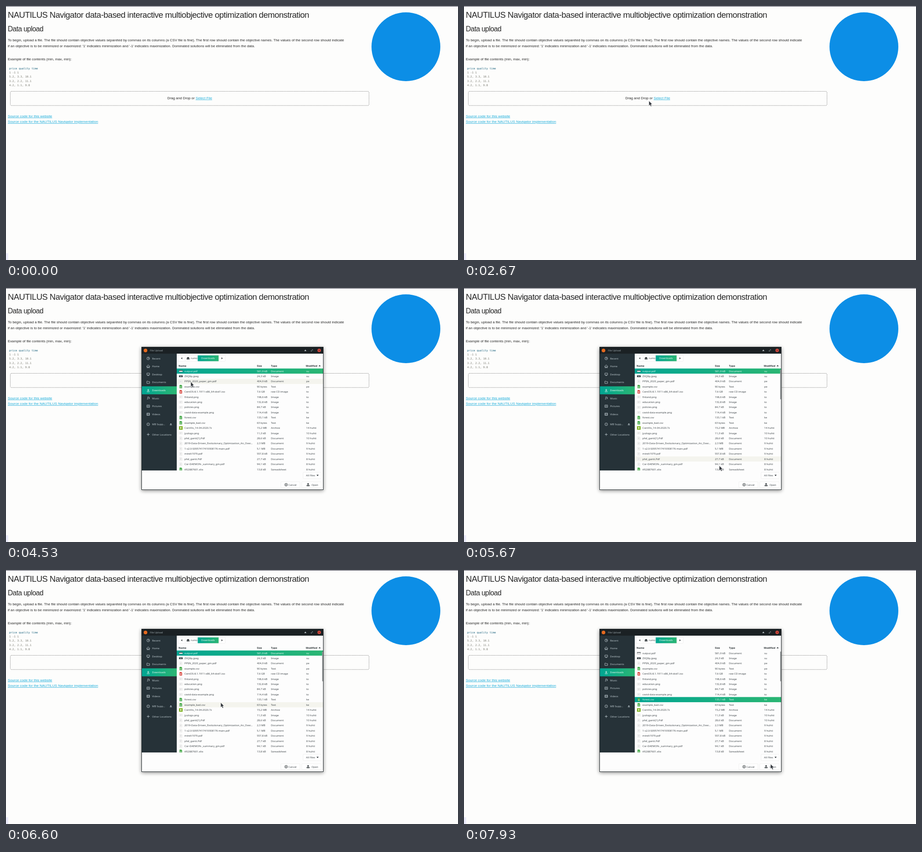
Write an HTML page that moves like this. It is 998 px wide and 561 px high and loops after 8 s.

```html
<!DOCTYPE html>
<html lang="en">
<head>
<meta charset="utf-8">
<style>
html, body { margin: 0; width: 100%; height: 100%; overflow: hidden; background: #fdfdfc; }
svg { display: block; }
text { font: 7.8px "Liberation Sans", Arial, sans-serif; fill: #262626; white-space: pre; }
.h1 { font-size: 18.6px; letter-spacing: -.54px; }
.h2 { font-size: 15.6px; letter-spacing: -.52px; }
.link { fill: #1eaedb; text-decoration: underline; }
.code { font: 5.86px "DejaVu Sans Mono", monospace; fill: #74746a; }
.code.head { fill: #17607c; }
.ui { font: 5.75px "Noto Sans", sans-serif; fill: #41484c; }
.bold { font-weight: 600; fill: #2c3336; }
.side { fill: #b9c5ca; }
.lit { fill: #e2f7ee; }
.title { font-size: 5.4px; fill: #9aa6ab; }
.icon { fill: none; stroke: #b9c5ca; stroke-width: .9; }
.btn { fill: #fff; stroke: #ededeb; stroke-width: .8; }
</style>
</head>
<body>
<svg id="stage" width="998" height="561" viewBox="0 0 998 561">
  <defs>
    <linearGradient id="green"><stop stop-color="#00a593"/><stop offset="1" stop-color="#2bb673"/></linearGradient>
    <clipPath id="listClip"><rect x="377" y="177" width="323" height="226"/></clipPath>
    <filter id="shadow" x="-10%" y="-10%" width="120%" height="120%"><feGaussianBlur stdDeviation="4"/></filter>
    <mask id="outside"><rect width="998" height="561" fill="#fff"/><rect x="299" y="130" width="402" height="316" fill="#000"/></mask>
  </defs>
  <rect width="998" height="561" fill="#fdfdfc"/>
  <rect width="998" height="1" fill="#383848"/>
  <rect y="546" width="5" height="15" fill="#ececfb"/>
  <g id="page"></g>
  <circle cx="883" cy="90" r="76" fill="#0c8ee6"/>
  <rect x="9.5" y="188.5" width="792" height="31.3" rx="2.5" fill="none" stroke="#555" stroke-width=".8" stroke-dasharray="1.6"/>
  <g id="dialog">
    <g mask="url(#outside)"><rect x="299" y="132" width="402" height="316" fill="#000" opacity=".45" filter="url(#shadow)"/></g>
    <g id="content">
      <rect x="299" y="130" width="402" height="316" fill="#fdfdfd"/>
      <rect x="299" y="144" width="78" height="259" fill="#263238"/>
      <rect x="300" y="217.2" width="77" height="17.6" fill="url(#green)"/>
      <g id="sidebar"></g>
      <g id="bar"></g>
      <g clip-path="url(#listClip)">
        <rect id="hover" x="377" width="323" height="11.4" fill="#f4f4ee"/>
        <rect id="pick" x="377" width="323" height="11.4" fill="url(#green)"/>
        <g id="list"></g>
        <rect id="scroll" x="698" y="180" width="2" height="66" rx="1" fill="#9a9f9f"/>
      </g>
    </g>
    <rect x="299.5" y="130.5" width="401" height="315" fill="none" stroke="#20272a"/>
    <rect x="299" y="130" width="402" height="15" fill="#1b2124"/>
    <circle cx="308" cy="138" r="4" fill="#e66a1f"/>
    <text class="ui title" x="318" y="139.7">File Upload</text>
    <path d="M658.6 139.3h4.8l-2.4-3.2z" fill="#c2cbcf"/>
    <path d="M673.6 139.6l3.6-3.6m-1.8 0h1.8v1.8m-3.6 0v1.8h1.8" fill="none" stroke="#98a3a8" stroke-width=".7"/>
    <circle cx="691.5" cy="137.7" r="3.8" fill="#d5473c"/>
    <path d="M690.2 136.4l2.6 2.6m0-2.6l-2.6 2.6" stroke="#301513" stroke-width=".7"/>
  </g>
  <path id="cursor" d="M0 0v10.2l2.2-2 1.8 3.8 1.8-.8-1.7-3.7 3-.2z" fill="#30343a" stroke="#eee" stroke-width=".5"/>
</svg>
<script>
const $ = id => document.getElementById(id);
const text = (x, y, s, cls = '') => `<text x="${x}" y="${y}" class="${cls}">${s}</text>`;
const ui = (x, mid, s, cls = '') => text(x, mid + 2.05, s, 'ui ' + cls);
const button = (x, y, w, h, fill = '#fff') =>
  `<rect class="btn" x="${x}" y="${y}" width="${w}" height="${h}" rx="1" style="fill:${fill}"/>`;
const shape = (x, y, d, attr = 'fill="#2c3336"') => `<path transform="translate(${x} ${y})" d="${d}" ${attr}/>`;

const code = ['price quality time', '1 -1 1', '5.2, 3.3, 10.1', '3.2, 2.2, 11.1', '4.2, 1.1, 9.8'];
$('page').innerHTML =
  text(4, 26, 'NAUTILUS Navigator data-based interactive multiobjective optimization demonstration', 'h1') +
  text(4, 56, 'Data upload', 'h2') +
  text(4, 78.3, 'To begin, upload a file. The file should contain objective values separeted by commas on its columns (a CSV file is fine). The first row should contain the objective names. The values of the second row should indicate') +
  text(4, 90.8, "if an objective is to be minimized or maximized: '1' indicates minimization and '-1' indicates maximization. Dominated solutions will be eliminated from the data.") +
  text(4, 120, 'Example of file contents (min, max, min):') +
  code.map((s, i) => text(7, 139.8 + i * 9.3, s, i ? 'code' : 'code head')).join('') +
  text(356.3, 205.8, 'Drag and Drop or <tspan class="link">Select File</tspan>') +
  text(4, 245.7, 'Source code for this website', 'link') +
  text(4, 258.2, 'Source code for the NAUTILUS Navigator implementation', 'link');

const house = 'M-3.7 .3L0-3.2 3.7 .3H2.5V3.2H.8V1H-.8V3.2H-2.5V.3z';
const disc = 'M-3 0a3 3 0 1 0 6 0a3 3 0 1 0-6 0';
const places = [
  ['Recent', 155.5, disc + 'M0-2V0H2'],
  ['Home', 173, house],
  ['Desktop', 190.5, 'M-3-2.5H3V1.6H-3zM-1.5 3H1.5'],
  ['Documents', 208.3, 'M-3-2.5H-.5L.5-1.5H3V2.5H-3z'],
  ['Downloads', 226, 'M0-3V1M-2-1L0 1 2-1M-3 3H3'],
  ['Music', 243.5, 'M-1 2V-3L2.5-2V1M-2.5 2H-1M1 1H2.5'],
  ['Pictures', 261, 'M-3-2.5H3V2.5H-3zM-2 1.5L0-1 2 1.5'],
  ['Videos', 278.8, 'M-3-2.5H3V2.5H-3zM-1.5-2.5V2.5M1.5-2.5V2.5'],
  ['MB Supp...', 301, disc + 'M-.8 0H.8'],
  ['Other Locations', 323.5, 'M-3 0H3M0-3V3']
];
$('sidebar').innerHTML = places.map(([name, y, d]) =>
  shape(314, y, d, `class="icon" ${name == 'Downloads' ? 'style="stroke:#fff"' : ''}`) +
  ui(322.5, y, name, name == 'Downloads' ? 'lit' : 'side')).join('') +
  shape(364, 301, 'M-2.3 .6L0-2.2 2.3 .6zM-2.3 1.4H2.3V2.2H-2.3z', 'fill="#b9c5ca"');

const upload = 'M-3.3 1H3.3V3H-3.3zM-.9 0V-1H-2.6L0-3.7 2.6-1H.9V0z';
$('bar').innerHTML =
  button(380, 148.5, 15.5, 13.5) + shape(388, 155.3, 'M1.2-2.3V2.3L-1.4 0z') +
  button(395.5, 148.5, 27.5, 13.5) + shape(402, 155.3, house) + ui(408, 155.3, 'rumo') +
  button(423, 148.5, 47, 13.5, 'url(#green)') + ui(431, 155.3, 'Downloads', 'lit') +
  button(470, 148.5, 14, 13.5) + shape(477, 155.3, 'M-1.2-2.3V2.3L1.4 0z') +
  ui(381, 171.8, 'Name', 'bold') + ui(554, 171.8, 'Size', 'bold') +
  ui(585, 171.8, 'Type', 'bold') + ui(662, 171.8, 'Modified', 'bold') +
  shape(692.5, 171.8, 'M-2.4 1.3H2.4L0-1.6z') +
  button(656, 407, 40, 14) + ui(662.5, 413.8, 'All Files') + shape(688, 413.8, 'M-2.4-1.3H2.4L0 1.6z') +
  button(607, 428, 42, 13) + shape(618.5, 434.5, disc, 'fill="none" stroke="#2c3336"') +
  shape(618.5, 434.5, 'M-1.3-1.3L1.3 1.3M1.3-1.3L-1.3 1.3', 'stroke="#2c3336"') + ui(623.5, 434.5, 'Cancel') +
  button(653, 428, 43, 13) + shape(667, 434.5, upload) + ui(674.5, 434.5, 'Open');

const TOP = 183.5, ROW = 11.42;
const files = `output.pdf|581,9 kB|Document|su
ZXQ9p.jpeg|24,3 kB|Image|su
PPSN_2020_paper_gm.pdf|404,9 kB|Document|pe
example.csv|90 bytes|Text|pe
CentOS-8.1.1911-x86_64-dvd1.iso|7,6 GB|raw CD image|to
finland.png|198,6 kB|Image|to
education.png|132,8 kB|Image|to
policies.png|84,7 kB|Image|to
covid-data-example.png|114,4 kB|Image|to
forest.csv|133,1 kB|Text|ke
example_bad.csv|63 bytes|Text|ke
ContVis_14-04-2020.7z|15,2 MB|Archive|14 huhti
jyulogo.png|11,3 kB|Image|10 huhti
phd_gantt(1).Pdf|28,6 kB|Document|10 huhti
2019-Data-Driven_Evolutionary_Optimization_An_Over...|2,3 MB|Document|9 huhti
1-s2.0-S0957417419308176-main.pdf|5,1 MB|Document|9 huhti
mirelt1979.pdf|557,8 kB|Document|9 huhti
phd_gantt.Pdf|27,7 kB|Document|8 huhti
Cor-DAEMON-_summary_gm.pdf|94,1 kB|Document|8 huhti
tf02887601.xltx|13,8 kB|Spreadsheet|8 huhti`.split('\n').map(s => s.split('|'));

const sheet = 'M-2.8-3.7H1.3L2.8-2.2V3.7H-2.8z';
const lines = 'M-1.5-.5H1.5M-1.5 1H1.5M-1.5 2.5H1.5';
function fileIcon(type, i, y) {
  if (i < 2) return shape(386, y, 'M-4-2H4.2V2H-4z', 'fill="#3c4347"') +
    shape(386, y, i ? 'M-2-.5H2V1H-2z' : 'M-3.6-.6H3.8V1.6H-3.6z', `fill="${i ? '#a9aeb0' : '#fff'}"`);
  if (type == 'Archive') return shape(386, y, 'M-4-4H4V4H-4z', 'fill="#84b52b"') + shape(386, y, 'M-1-2H1V2H-1z', 'fill="#eef5dd"');
  if (type == 'raw CD image') return shape(386, y, sheet, 'fill="#d9453d"') + shape(386, y + .6, 'M-1.4 0a1.4 1.4 0 1 0 2.8 0a1.4 1.4 0 1 0-2.8 0', 'fill="#fff"');
  if (type == 'Text' || type == 'Spreadsheet')
    return shape(386, y, sheet, 'fill="#43a847"') + shape(386, y, lines, 'stroke="#e6f5e6" stroke-width=".7"');
  return shape(386, y, type == 'Image' ? 'M-3.5-2.5H3.5V2.5H-3.5z' : sheet, 'fill="#f5f5f4" stroke="#dededc" stroke-width=".5"') +
    shape(386, y - .8, 'M-1.8 0H1.5M-1.8 1.6H1', 'stroke="#b5b5bd" stroke-width=".5"');
}
$('list').innerHTML = files.map(([name, size, type, day], i) => {
  const y = TOP + i * ROW;
  return `<g>${fileIcon(type, i, y)}${ui(394, y, name)}${ui(554, y, size)}${ui(585, y, type)}${ui(663, y, day)}</g>`;
}).join('');
const rows = [...$('list').children];

// Pointer stops: time, x, y
const path = [
  [730, 59, 405], [930, 215, 372], [1130, 312, 362.5], [1733, 312, 362.5], [1800, 349.5, 353.7],
  [2000, 442, 288], [2130, 437, 267], [2400, 437, 267], [2670, 408, 209], [3330, 408, 209],
  [3400, 408, 207.5], [4730, 408, 207.5], [5100, 455, 268], [5500, 545, 370], [5900, 590, 424],
  [6200, 559, 349.7], [6450, 498, 302], [6670, 463, 288.7], [7270, 463, 288.7],
  [7500, 540, 345], [7800, 664, 420], [7930, 677, 428.7], [8000, 677, 428.7]
];
function pointer(t) {
  const i = Math.max(1, path.findIndex(p => p[0] >= t));
  const [a, b] = [path[i - 1], path[i]];
  const k = Math.max(0, (t - a[0]) / (b[0] - a[0]));
  return [a[1] + (b[1] - a[1]) * k, a[2] + (b[2] - a[2]) * k];
}
const show = (id, on) => $(id).setAttribute('visibility', on ? 'inherit' : 'hidden');
const rowY = i => TOP + (i - .5) * ROW;

function draw(now) {
  const step = 8000 / 120;
  const t = Math.floor((now % 8000 + 4) / step) % 120 * step;
  const [x, y] = pointer(t);
  $('cursor').setAttribute('transform', `translate(${x.toFixed(2)} ${y.toFixed(2)})`);
  show('cursor', t > 725);
  show('dialog', t > 3860);
  show('content', t > 4050);
  show('scroll', t > 4725);

  const [hx, hy] = pointer(t - 100);
  const over = Math.round((hy - TOP) / ROW);
  show('hover', t > 4050 && hx > 377 && hy < 403);
  $('hover').setAttribute('y', rowY(over));

  const picked = t > 6860 ? 9 : 0;
  $('pick').setAttribute('y', rowY(picked));
  rows.forEach((row, i) => row.querySelectorAll('text').forEach(el => el.classList.toggle('lit', i == picked)));
  requestAnimationFrame(draw);
}
requestAnimationFrame(draw);
</script>
</body>
</html>
```
